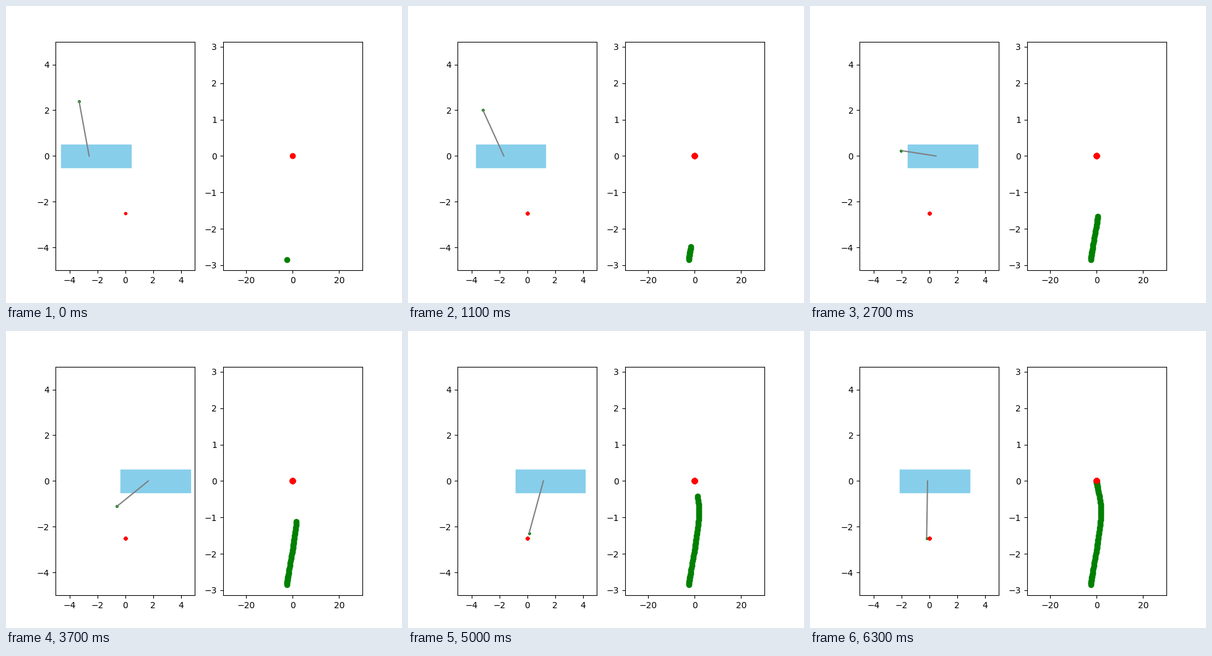
A matplotlib script that plays this animation: 640 px wide and 480 px high, repeating every 6400 ms.

```python
import numpy as np
import matplotlib.pyplot as plt
from matplotlib.animation import FuncAnimation
from matplotlib.patches import Rectangle

FRAMES, INTERVAL = 64, 100
POLE = 2.5

# Key poses: step, cart position, pole angle (0 hangs down)
KEY_STEPS = [0, 11, 21, 27, 37, 45, 55, 63]
KEY_X = [-2.59, -1.68, -0.04, 0.48, 1.65, 1.735, 0.46, -0.12]
KEY_ANGLE = [-2.85, -2.50, -1.89, -1.665, -1.112, -0.69, -0.197, -0.027]


def smooth(t, keys, values):
    """Cubic Hermite curve through the key values."""
    keys, values = np.array(keys, float), np.array(values)
    slopes = np.gradient(values, keys)
    k = np.clip(np.searchsorted(keys, t, side="right") - 1, 0, len(keys) - 2)
    h = keys[k + 1] - keys[k]
    u = (t - keys[k]) / h
    ease = u * u * (3 - 2 * u)
    return (values[k] * (1 - ease) + values[k + 1] * ease
            + h * u * (1 - u) * ((1 - u) * slopes[k] - u * slopes[k + 1]))


steps = np.arange(FRAMES)
cart_x = smooth(steps, KEY_STEPS, KEY_X)
angle = smooth(steps, KEY_STEPS, KEY_ANGLE)

fig, (scene, space) = plt.subplots(1, 2, figsize=(6.4, 4.8), dpi=100)
scene.set_xlim(-5, 5)
scene.set_ylim(-5, 5)
space.set_xlim(-30, 30)
space.set_ylim(-np.pi, np.pi)

cart = scene.add_patch(Rectangle((0, -0.5), 5, 1, color="skyblue"))
tip, = scene.plot([], [], "go", markersize=2.5)
pole, = scene.plot([], [], color="gray")
goal, = scene.plot([], [], "r.")

# Each step stamps its state, then the goal over it
stamps = [space.plot([x], [a], "go", [0], [0], "ro")
          for x, a in zip(cart_x, angle)]


def draw(i):
    x, a = cart_x[i], angle[i]
    end_x, end_y = x + POLE * np.sin(a), -POLE * np.cos(a)
    cart.set_x(x - 2)
    pole.set_data([x, end_x], [0, end_y])
    tip.set_data([end_x], [end_y])
    goal.set_data(np.zeros(i + 1), np.full(i + 1, -POLE))
    for k, pair in enumerate(stamps):
        for dot in pair:
            dot.set_visible(k <= i)


anim = FuncAnimation(fig, draw, frames=FRAMES, interval=INTERVAL,
                     repeat=True, repeat_delay=0)
plt.show()
```
